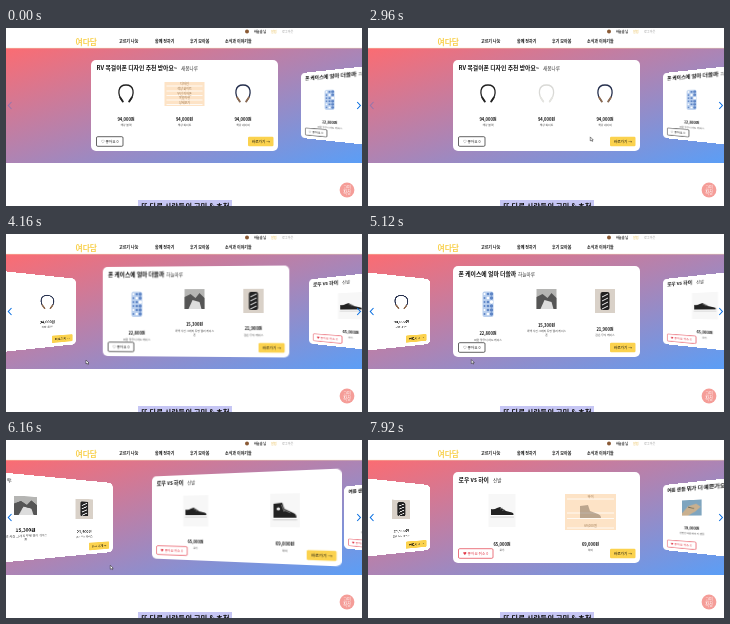
Recreate the animation shown at these times as an HTML page. Size 356 px wide and 178 px high, loop 8 s.

```html
<!DOCTYPE html>
<html>
<head>
<meta charset="utf-8">
<title>Choice cards</title>
<style>
  html, body { margin: 0; width: 100%; height: 100%; overflow: hidden; background: #fff; }
  #stage { position: relative; width: 356px; height: 178px; overflow: hidden; background: #fff; }
  svg { position: absolute; display: block; }
  text { font-family: "Noto Sans CJK KR", "Noto Sans CJK JP", "Noto Sans CJK", sans-serif; fill: #111; }
  #deck {
    position: absolute; left: 0; top: 20px; width: 356px; height: 115px; overflow: hidden;
    background: linear-gradient(to bottom right, #fb6c72, #ad84b4 50%, #5b9ef6);
    perspective: 222px; perspective-origin: 178.5px 57.5px;
  }
  .card { left: 85px; top: 12px; width: 187px; height: 91px; background: #fff; border-radius: 5px; }
  #page { left: 0; top: 0; }
  .mid { text-anchor: middle; }
  .bold { font-weight: 700; }
</style>
</head>
<body>
<div id="stage">
  <div id="deck"></div>
  <svg id="page" width="356" height="178" viewBox="0 0 356 178">
    <path d="M0 20.2H356" stroke="#f3d9b0" stroke-width=".5"/>
    <text x="69.5" y="16.8" font-size="7.8" font-weight="900" style="fill:#f8d04c">여다담</text>
    <g class="bold" font-size="4">
      <text x="113" y="15">고르기 나눔</text>
      <text x="149" y="15">함께 정하기</text>
      <text x="184" y="15">후기 모아봄</text>
      <text x="219" y="15">소식과 이야기들</text>
    </g>
    <circle cx="241" cy="3.5" r="2" fill="#8a5a35"/>
    <g font-size="3.1">
      <text class="bold" x="248" y="4.8">하늘솔 님</text>
      <text x="265" y="4.8" style="fill:#e6b84a">알림</text>
      <text x="276" y="4.8" style="fill:#999">로그아웃</text>
    </g>
    <rect x="132" y="172" width="94" height="6" fill="#c6c6f4"/>
    <text class="bold" x="135" y="180.6" font-size="7.4">또 다른 사람들의 고민 &amp; 추천</text>
    <circle cx="341" cy="162" r="7.4" fill="#f59d98"/>
    <g class="mid" font-size="4.2">
      <text x="341" y="161.4" style="fill:#fff">고민</text>
      <text x="341" y="166.2" style="fill:#fff">작성</text>
    </g>
    <g fill="none" stroke="#0a6fe0" stroke-width="1.1">
      <path id="prev" d="M5.5 74 2.3 77.5 5.5 81"/>
      <path d="M351.2 74 354.4 77.5 351.2 81"/>
    </g>
    <path id="cursor" d="M0 0V4L1 3.2 1.8 4.6 2.4 4.3 1.8 3H3Z" fill="#fff" stroke="#222" stroke-width=".5"/>
  </svg>
</div>
<script>
const LOOP = 8000, SPACING = 224, TILT = 50, DEPTH = 18.5;
const $ = id => document.getElementById(id);

const text = (x, y, size, str, cls = '', fill = '#111') =>
  `<text x="${x}" y="${y}" font-size="${size}" class="${cls}" style="fill:${fill}">${str}</text>`;
const box = (cx, y, w, h, fill, extra = '') =>
  `<rect x="${cx - w / 2}" y="${y}" width="${w}" height="${h}" fill="${fill}" ${extra}/>`;

const neckband = (x, color, tip) =>
  `<g transform="translate(${x} 0)" fill="none" stroke-linecap="round">
    <path d="M-3.2 73.5C-9.5 66-8 57 0 57S9.5 66 3.2 73.5" stroke="${color}" stroke-width="1.3"/>
    <path d="M-5.8 69.5-3.2 73.5M5.8 69.5 3.2 73.5" stroke="${tip}" stroke-width="1.8"/></g>`;

const phoneCase = x => {
  let marks = '';
  for (let i = 0; i < 18; i++)
    marks += `<circle cx="${x - 3.5 + i % 3 * 3.5}" cy="${60 + Math.floor(i / 3) * 4}" r="${1 + i * 7 % 3 * .35}" fill="${i % 4 ? '#5f86c6' : '#fff'}"/>`;
  return box(x, 57.5, 11, 25.5, '#b9cfee', 'rx="2"') + marks;
};
const greyPhoto = x => box(x, 55, 20, 20, '#b5b5b3') +
  `<path d="M${x - 10} 75V63l6-3 5 4 4-5 5 5v11Z" fill="#555"/><path d="M${x - 6} 75l4-9 7 2 2 7Z" fill="#ddd"/>`;
const stripedPhoto = x => box(x, 55, 20, 24, '#d9d1c8') + box(x, 58, 9, 18, '#222', 'rx="2"') +
  `<path d="M${x - 3} 63l6-3M${x - 3} 67l6-3M${x - 3} 71l6-3M${x - 3} 75l6-3" stroke="#eee" stroke-width="1"/>`;
const lowShoe = x => box(x, 54, 27, 33, '#f7f7f7') +
  `<path d="M${x - 11} 75v-6q3 1 6-1l3-1 6 4 6 1.5q2 .8 1.5 2.5Z" fill="#222"/>
   <path d="M${x - 11.5} 75.8H${x + 12}" stroke="#fff" stroke-width="1.7"/>
   <path d="M${x - 11.5} 77H${x + 12}M${x - 2} 69l3-1M${x} 70.5l3-1" stroke="#aaa" stroke-width=".5"/>`;
const highShoe = x => box(x, 54, 27, 33, '#f7f7f7') +
  `<path d="M${x - 10.5} 78V64l8-1 2 6 8 4q3 1 3 5Z" fill="#222"/>
   <circle cx="${x - 6}" cy="69" r="1.6" fill="#eee"/>
   <path d="M${x - 11} 78.6H${x + 11}" stroke="#fff" stroke-width="1.8"/>
   <path d="M${x - 11} 79.8H${x + 11}M${x - 3} 65l2.5 7M${x - 1} 70l6 3" stroke="#aaa" stroke-width=".6"/>`;
const handPhoto = x => box(x, 55, 22, 20, '#7fa5bf') +
  `<path d="M${x - 11} 72l7-9 9-3 5 4-6 6-8 5h-7Z" fill="#c9b08f"/><path d="M${x - 4} 64l7 2" stroke="#665" stroke-width="1"/>`;

const item = (x, picture, price, y, captions) => picture +
  text(x, y + 1.5, 4.1, price, 'mid bold') +
  captions.map((c, i) => text(x, y + 7.2 + i * 4, 2.8, c, 'mid', '#444')).join('');

const hover = (x, w, h, lines) => `<g class="hover">` + box(x, 54, w, h, '#fde3c6') +
  lines.map(([y, str, size]) =>
    `<path d="M${x - w / 2 + 2} ${y + 2}h${w - 4}" stroke="#fff" stroke-width=".8"/>` +
    text(x, y + 1, size, str, 'mid', '#9a7650')).join('') + '</g>';

const card = ({ title, sub, subX, liked, body }) => {
  const ink = liked ? '#e23b4a' : '#222';
  return text(90.5, 42.2, 5.85, title, 'bold') + text(subX, 41.7, 4.6, sub, '', '#333') + body +
    `<rect x="90.5" y="108.7" width="${liked ? 34.5 : 26.5}" height="9.6" rx="1.2" fill="#fff" stroke="${ink}" stroke-width=".7"/>` +
    text(liked ? 107.7 : 103.7, 114.9, 3.7, liked ? '♥ 좋아요 취소 0' : '♡ 좋아요 0', 'mid', ink) +
    '<rect x="242" y="108.8" width="25.5" height="9.4" rx="1.2" fill="#fbd24e"/>' +
    text(254.8, 114.9, 3.7, '바로가기 →', 'mid');
};

const cards = [
  { title: 'RV 목걸이폰 디자인 추천 받아요~', sub: '새봄나루', subX: 175,
    body: item(120, neckband(120, '#222', '#222'), '94,000원', 91, ['색상 블랙']) +
      item(178.5, neckband(178.5, '#d9d9d6', '#e4e4e0'), '94,000원', 91, ['색상 화이트']) +
      item(237, neckband(237, '#26304e', '#8c6a50'), '94,000원', 91, ['색상 네이비']) +
      hover(178.5, 40, 24, [[56, '디자인', 3], [61, '색상 화이트', 3], [65.5, '무선 이어폰', 3], [70, '목걸이형', 3], [74.5, '상세보기', 3]]) },
  { title: '폰 케이스에 얼마 더쓸까', sub: '하늘마루', subX: 150,
    body: item(120, phoneCase(120), '22,800원', 99.5, ['파란 꽃무늬 하드 케이스']) +
      item(178.5, greyPhoto(178.5), '15,300원', 91, ['흑백 사진 그래픽 투명 젤리 케이스', '폰']) +
      item(237, stripedPhoto(237), '21,900원', 95, ['검은 무늬 케이스']) },
  { title: '로우 vs 하이', sub: '신발', subX: 125, liked: true,
    body: item(134, lowShoe(134), '65,000원', 104, ['로우']) +
      item(222.5, highShoe(222.5), '69,000원', 104, ['하이']) +
      hover(222.5, 51, 36, [[57, '하이', 3.4], [71, '', 3], [76.5, '', 3], [86, '69,000원', 3.2]]) +
      '<path class="hover" d="M212 78V66l8-1 2 6 8 3q3 1 3 4Z" fill="#6b5a48" opacity=".45"/>' },
  { title: '여름 샌들 뭐가 더 예쁜가요?', sub: '구름숲', subX: 168, liked: true,
    body: item(120, handPhoto(120), '39,000원', 92, ['편안한 여름 베이지 샌들']) +
      item(178.5, handPhoto(178.5), '42,000원', 92, ['가벼운 샌들']) +
      item(237, handPhoto(237), '45,000원', 92, ['시원한 샌들']) }
];
$('deck').innerHTML = cards.map(c => `<svg class="card" viewBox="85 32 187 91">${card(c)}</svg>`).join('');
const slides = [...document.querySelectorAll('.card')];
const hovers = slides.map(s => [...s.querySelectorAll('.hover')]);

// Tracks are [time, value, ...] rows.
const slideTrack = [[3050, 0], [3360, .3], [3680, .63], [3920, .84], [4160, .955], [4560, .992], [4960, 1],
  [5440, 1], [5760, 1.37], [6000, 1.63], [6300, 1.86], [6560, 1.95], [6960, 1.992], [7280, 2]];
const cursorTrack = [[1400, 180, 72], [1920, 222, 106], [2320, 219, 104], [2560, 222, 108.5], [3050, 222.3, 109],
  [3680, 98, 126.5], [4160, 80, 126], [5080, 80, 126], [5300, 205, 124], [5440, 205, 124],
  [5760, 100.5, 128], [6560, 108, 122.5], [7080, 108, 122.5], [7280, 207, 92], [7640, 207, 92], [7880, 220, 72]];

function sample(track, t) {
  const i = track.findIndex(k => k[0] > t);
  if (i === 0) return track[0].slice(1);
  if (i < 0) return track[track.length - 1].slice(1);
  const a = track[i - 1], b = track[i], f = (t - a[0]) / (b[0] - a[0]);
  return a.slice(1).map((v, n) => v + (b[n + 1] - v) * f);
}

function draw(t) {
  const [pos] = sample(slideTrack, t);
  slides.forEach((s, i) => {
    const off = i - pos;
    s.style.visibility = Math.abs(off) < 1.6 ? 'visible' : 'hidden';
    s.style.transform = `translate3d(${off * SPACING}px,0,${-DEPTH * Math.abs(off)}px) rotateY(${-TILT * off}deg)`;
  });
  const first = Math.max(0, Math.min(1, (1650 - t) / 150));
  const last = t >= 7880 ? 1 : 0;
  hovers[0].forEach(h => h.style.opacity = first);
  hovers[2].forEach(h => h.style.opacity = h.tagName === 'path' ? last * .45 : last);
  $('prev').style.opacity = pos < .5 ? .3 : 1;
  const [x, y] = sample(cursorTrack, t);
  $('cursor').setAttribute('transform', `translate(${x} ${y})`);
  $('cursor').style.opacity = first === 1 || last ? 0 : 1;
}

const start = performance.now();
function tick() {
  draw((performance.now() - start) % LOOP);
  requestAnimationFrame(tick);
}
tick();
</script>
</body>
</html>
```
